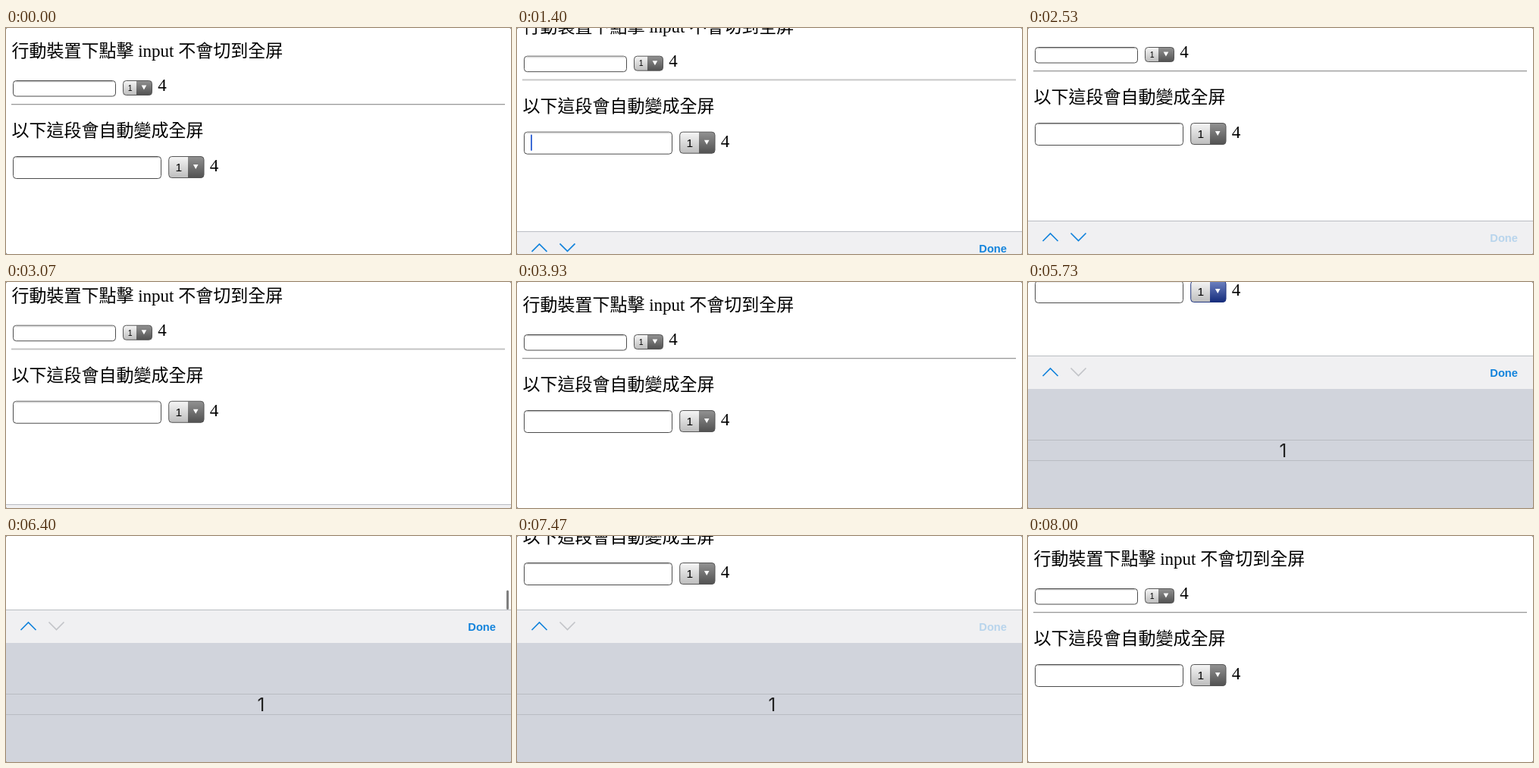
Write an HTML page that moves like this. It is 666 px wide and 298 px high and loops after 9390 ms.

```html
<!DOCTYPE html>
<html lang="zh-Hant">
<head>
<meta charset="utf-8">
<title>Input focus demo</title>
<style>
html, body { margin: 0; width: 100%; height: 100%; overflow: hidden; background: #555; }
svg { display: block; width: 666px; height: 298px; background: #fff; border-radius: 2px; }
.copy { font: 23px "Liberation Serif", "Noto Sans CJK TC", "Noto Sans CJK JP", "Noto Sans CJK", serif; }
.value { font-family: "Liberation Sans", sans-serif; text-anchor: middle; }
.field { fill: #fff; stroke: #4c4c4c; }
.rule { stroke: #b9bcc2; }
.arrow { fill: none; stroke-width: 1.7; }
.done { font: bold 14.7px "Liberation Sans", sans-serif; fill: #1484dc; text-anchor: end; }
.wheel { font: 24px Inter, sans-serif; fill: #222; text-anchor: middle; }
</style>
</head>
<body>
<svg viewBox="0 0 666 298">
  <defs>
    <linearGradient id="light" x2="0" y2="1"><stop stop-color="#f6f6f6"/><stop offset="1" stop-color="#bdbdbd"/></linearGradient>
    <linearGradient id="gray" x2="0" y2="1"><stop stop-color="#929292"/><stop offset="1" stop-color="#515151"/></linearGradient>
    <linearGradient id="blue" x2="0" y2="1"><stop stop-color="#7084c2"/><stop offset="1" stop-color="#152c7c"/></linearGradient>
  </defs>
  <g id="page">
    <g class="copy">
      <text x="7.4" y="38">行動裝置下點擊 input 不會切到全屏</text>
      <text x="200.2" y="83">4</text>
      <text x="7.4" y="143">以下這段會自動變成全屏</text>
      <text x="268.7" y="189">4</text>
    </g>
    <path d="M7 100.5H658" stroke="#9a9a9a"/>
    <path d="M7 101.5H658" stroke="#dedede"/>
    <g id="controls"></g>
    <rect id="caret" x="18" y="173" width="2" height="21" fill="#3f6cd6"/>
  </g>
  <rect id="thumb" x="660" width="3" rx="1.5" fill="#7f7f7f"/>
  <g id="bar">
    <rect width="666" height="44" fill="#f0f0f2"/>
    <rect y="44" width="666" height="260" fill="#d1d4dc"/>
    <path class="rule" d="M0 .5H666M0 111.5H666M0 138.5H666"/>
    <path class="arrow" d="M19.5 27L29.5 17L39.5 27" stroke="#1484dc"/>
    <path class="arrow" id="next" d="M56.5 16.5L66.5 26.5L76.5 16.5"/>
    <text class="done" id="done" x="646" y="28">Done</text>
    <text class="wheel" x="336.5" y="134">1</text>
  </g>
</svg>
<script>
const LOOP = 9390;
const FPS = 15;
const BOTTOM = 201;
const $ = id => document.getElementById(id);
const clamp = v => Math.max(0, Math.min(1, v));

// Moves start and end on ticks; a higher power eases out harder.
const move = (start, end, by, power = 1) =>
  n => by * (1 - (1 - clamp((n - start) / (end - start))) ** power);
const sum = (base, moves) => n => moves.reduce((v, m) => v + m(n), base);

const scrollAt = sum(0, [
  move(17, 27, 44, 2.6),
  move(39, 48, -44, .85),
  move(65, 66, 171),
  move(86, 93, 40),
  move(94, 100, -10, 2),
  move(110, 116, -BOTTOM)
]);
const barAt = sum(299, [
  move(17, 27, -45, 2.3),
  move(39, 48, 45, 1.34),
  move(65, 66, -192),
  move(66, 73, -10, 3),
  move(112, 116, 202)
]);

const between = (n, a, b) => n >= a && n < b;
const fade = (n, a, b) => clamp((b - n) / (b - a));

function field(y, w, h) {
  return `<rect class="field" x="9.5" y="${y}" width="${w}" height="${h}" rx="4"/>
    <path d="M12 ${y + 1}h${w - 5}" stroke="#c4c4c4"/>
    <path d="M11 ${y + 2}h${w - 3}" stroke="#ececec"/>`;
}

function select(id, x, y, w, h, split, size) {
  const r = x + w, b = y + h, mid = y + h / 2;
  const tx = (split + r) / 2 - .3;
  return `<g id="${id}">
    <rect x="${x}" y="${y}" width="${w}" height="${h}" rx="4" fill="url(#light)"/>
    <path class="button" d="M${split} ${y}H${r - 4}q4 0 4 4V${b - 4}q0 4 -4 4H${split}z"/>
    <rect class="edge" x="${x}" y="${y}" width="${w}" height="${h}" rx="4" fill="none"/>
    <text class="value" x="${(x + split) / 2 + .5}" y="${mid + size * .36}" font-size="${size}">1</text>
    <path d="M${tx - 3.3} ${mid - 3.5}h6.6l-3.3 6z" fill="#fff"/>
  </g>`;
}

$("controls").innerHTML =
  field(69.5, 135, 20.5) + field(169.5, 195, 29) +
  select("small", 154.5, 69.5, 38, 19, 172, 10.5) +
  select("large", 214.7, 169.5, 46.3, 28, 240, 15.5);

function tint(id, focused) {
  const el = $(id);
  el.querySelector(".button").setAttribute("fill", focused ? "url(#blue)" : "url(#gray)");
  el.querySelector(".edge").setAttribute("stroke", focused ? "#20357f" : "#555");
}
tint("small", false);

function draw(ms) {
  const n = Math.floor(ms * FPS / 1000 + .06);
  const scroll = scrollAt(n);
  const picker = n >= 66;
  const pressed = between(n, 38, 41) || between(n, 111, 114);

  $("page").setAttribute("transform", `translate(0 ${-scroll})`);
  $("bar").setAttribute("transform", `translate(0 ${barAt(n)})`);
  $("caret").setAttribute("opacity", n < 16 ? 0 : fade(n, 30, 33));
  $("next").setAttribute("stroke", picker ? "#c3c5c9" : "#1484dc");
  $("done").setAttribute("opacity", pressed ? .25 : 1);
  tint("large", between(n, 66, 111));

  // The scroll thumb shrinks while the page is pulled past its end.
  const size = 30 - Math.max(0, scroll - BOTTOM);
  const top = scroll > BOTTOM ? 97 - size : 1 + scroll / BOTTOM * 66;
  $("thumb").setAttribute("y", top);
  $("thumb").setAttribute("height", size);
  $("thumb").setAttribute("opacity", n < 87 ? 0 : fade(n, 102, 105));
}

function tick(now) {
  draw(now % LOOP);
  requestAnimationFrame(tick);
}
draw(0);
requestAnimationFrame(tick);
</script>
</body>
</html>
```
